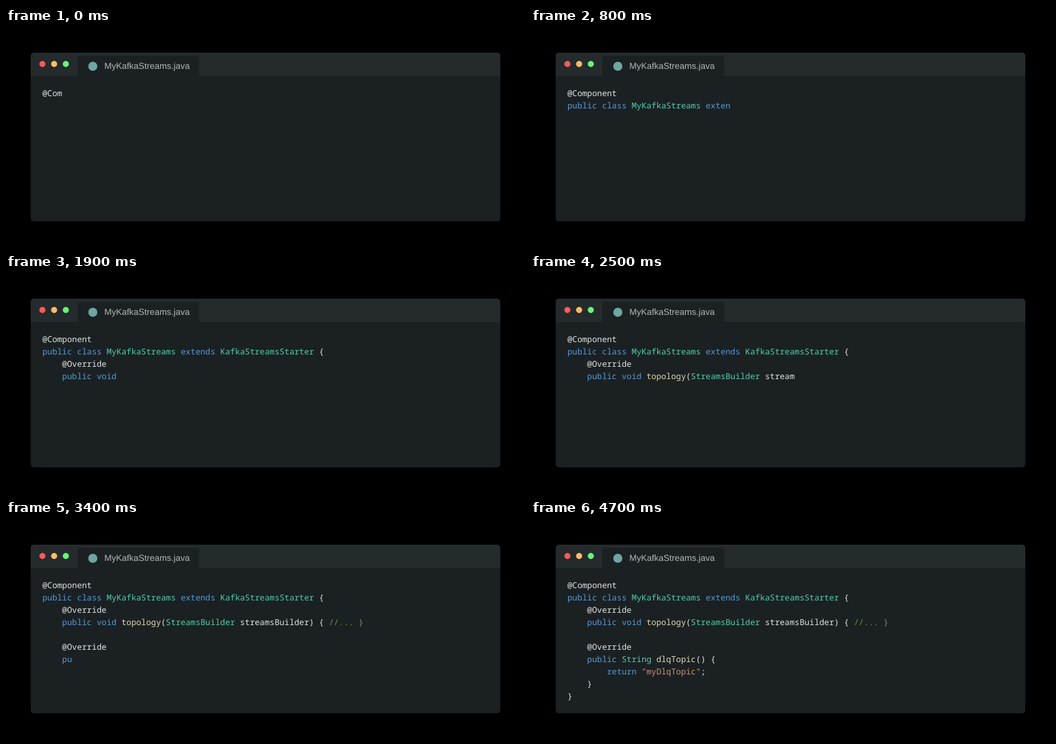
An HTML page with a canvas that plays this animation: 798x336 px, repeating every 5800 ms.

```html
<!DOCTYPE html>
<html lang="en">
<head>
<meta charset="utf-8">
<title>MyKafkaStreams.java</title>
<style>
  html, body { margin: 0; width: 100%; height: 100%; overflow: hidden; background: #000; }
  #stage { position: relative; width: 798px; height: 336px; overflow: hidden; }
  canvas { position: absolute; left: 0; top: 0; }
  #title {
    position: absolute; left: 151.3px; top: 50px; line-height: 17px; white-space: pre;
    font-family: "Liberation Sans", Arial, sans-serif; font-size: 13.5px; color: #b3b7b9;
    text-rendering: geometricPrecision;
  }
  #code {
    position: absolute; left: 56px; top: 91.4px; margin: 0; line-height: 18.9px;
    font-family: "Noto Sans Mono", "DejaVu Sans Mono", monospace; font-size: 12.667px;
    font-variant-ligatures: none; text-rendering: geometricPrecision; color: #e2e4e4;
  }
  .k { color: #569cd6; }
  .t { color: #4ed0ac; }
  .f { color: #dcdcaa; }
  .s { color: #ce9178; }
  .c { color: #6a9955; }
</style>
</head>
<body>
<div id="stage">
  <canvas id="shapes" width="798" height="336"></canvas>
  <div id="title">MyKafkaStreams.java</div>
  <pre id="code"></pre>
</div>
<script>
const LOOP = 5800, STEP = 100, FIRST = 4, PER_STEP = 5;

// [style, text]; an empty style is plain text
const tokens = [
  ['', '@Component\n'],
  ['k', 'public class '], ['t', 'MyKafkaStreams '], ['k', 'extends '], ['t', 'KafkaStreamsStarter '], ['', '{\n'],
  ['', '    @Override\n'],
  ['k', '    public void '], ['f', 'topology'], ['', '('], ['t', 'StreamsBuilder '],
  ['', 'streamsBuilder) { '], ['c', '//... }\n'],
  ['', '    \n    @Override\n'],
  ['k', '    public '], ['t', 'String '], ['f', 'dlqTopic'], ['', '() {\n'],
  ['k', '        return '], ['s', '"myDlqTopic"'], ['', ';\n    }\n}']
];

function drawWindow() {
  const ctx = document.getElementById('shapes').getContext('2d');
  const box = (x, y, w, h, r, color) => {
    ctx.fillStyle = color;
    ctx.beginPath();
    ctx.roundRect(x, y, w, h, r);
    ctx.fill();
  };
  const dot = (x, y, r, color) => {
    ctx.fillStyle = color;
    ctx.beginPath();
    ctx.arc(x, y, r, 0, Math.PI * 2);
    ctx.fill();
  };
  box(38, 38, 722, 260, 5, '#1b2023');
  box(38, 38, 722, 36, [5, 5, 0, 0], '#252a2d');
  box(110, 43, 187, 31, [4, 4, 0, 0], '#1b2023');
  dot(56, 55.5, 4.7, '#fc5b57');
  dot(74, 55.5, 4.7, '#fdbc67');
  dot(92, 55.5, 4.7, '#67f57a');
  dot(133.5, 59, 7, '#6fa5a3');
}

const spans = tokens.map(([style]) => {
  const span = document.createElement('span');
  span.className = style;
  return document.getElementById('code').appendChild(span);
});

let shown = -1;
function type(count) {
  if (count === shown) return;
  shown = count;
  let left = count;
  tokens.forEach(([, text], i) => {
    spans[i].textContent = text.slice(0, Math.max(0, left));
    left -= text.length;
  });
}

function frame() {
  const t = performance.now() % LOOP;
  type(FIRST + PER_STEP * Math.floor(t / STEP));
  requestAnimationFrame(frame);
}

drawWindow();
type(FIRST);
requestAnimationFrame(frame);
</script>
</body>
</html>
```
